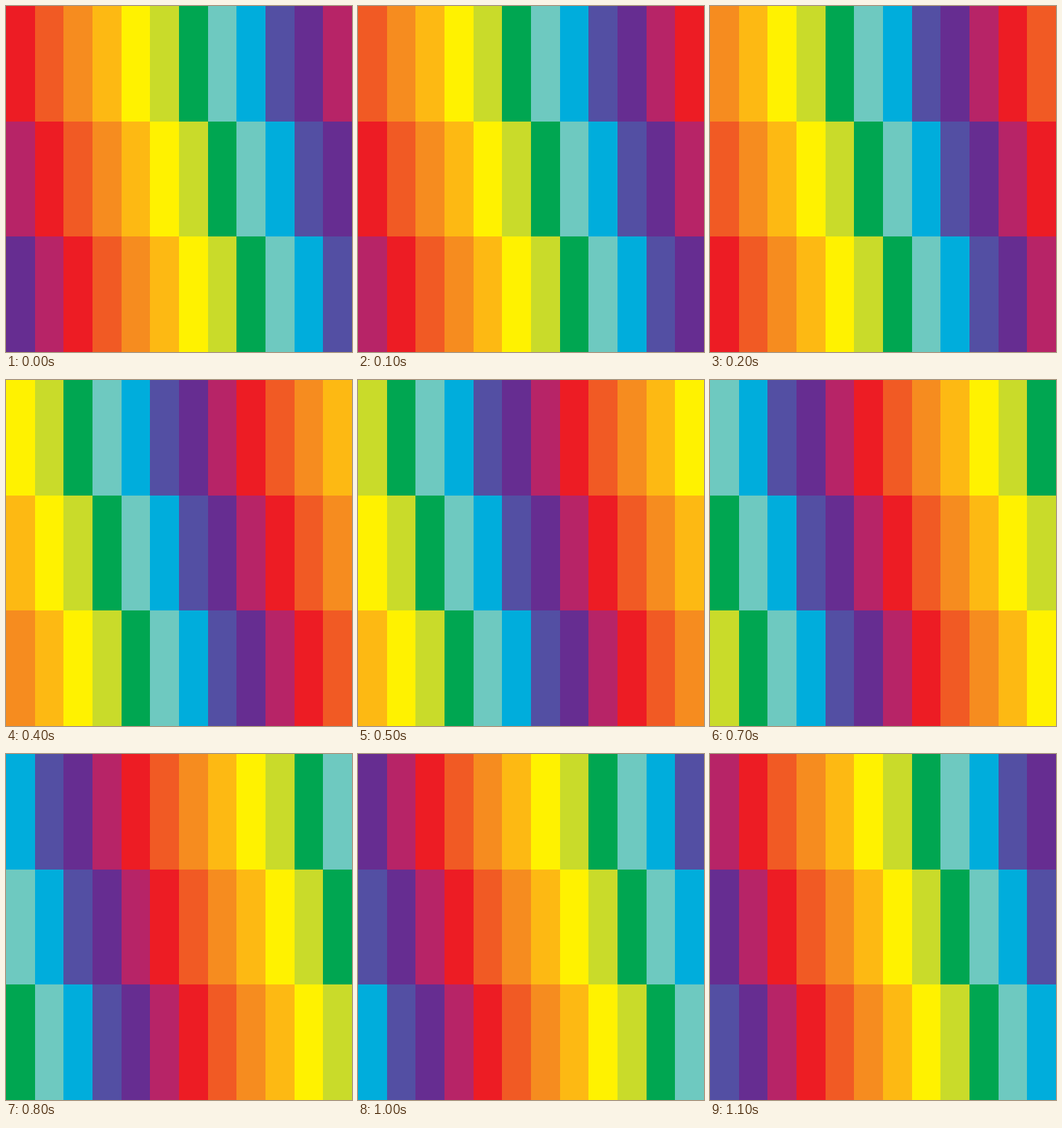
These frames come from a looping animation (500x500 px, 1200 ms). An HTML page:

```html
<!DOCTYPE html>
<html lang="en">
<head>
<meta charset="utf-8">
<title>Rainbow columns</title>
<style>
  html, body { margin: 0; width: 100%; height: 100%; overflow: hidden; }
  #grid {
    display: grid;
    grid-template: repeat(3, 1fr) / repeat(12, 1fr);
    width: 100%;
    height: 100%;
  }
  #grid i { animation: hue 1200ms step-end infinite; }

  /* Stops sit just before each 100 ms mark so the change is never late. */
  @keyframes hue {
    0%     { background: #ed1c24; }
    8.33%  { background: #f15a24; }
    16.66% { background: #f68c1f; }
    24.99% { background: #fdb913; }
    33.33% { background: #fff200; }
    41.66% { background: #c9db2a; }
    49.99% { background: #00a651; }
    58.33% { background: #6ec9c0; }
    66.66% { background: #00addc; }
    74.99% { background: #534fa3; }
    83.33% { background: #662d91; }
    91.66% { background: #b72467; }
  }
</style>
</head>
<body>
<div id="grid"></div>
<script>
  const COLS = 12, ROWS = 3, STEP = 100;
  const grid = document.getElementById('grid');

  // Each row trails the one above by one colour.
  for (let row = 0; row < ROWS; row++) {
    for (let col = 0; col < COLS; col++) {
      const cell = document.createElement('i');
      const phase = (col - row + COLS) % COLS;
      cell.style.animationDelay = `${-phase * STEP}ms`;
      grid.append(cell);
    }
  }
</script>
</body>
</html>
```
